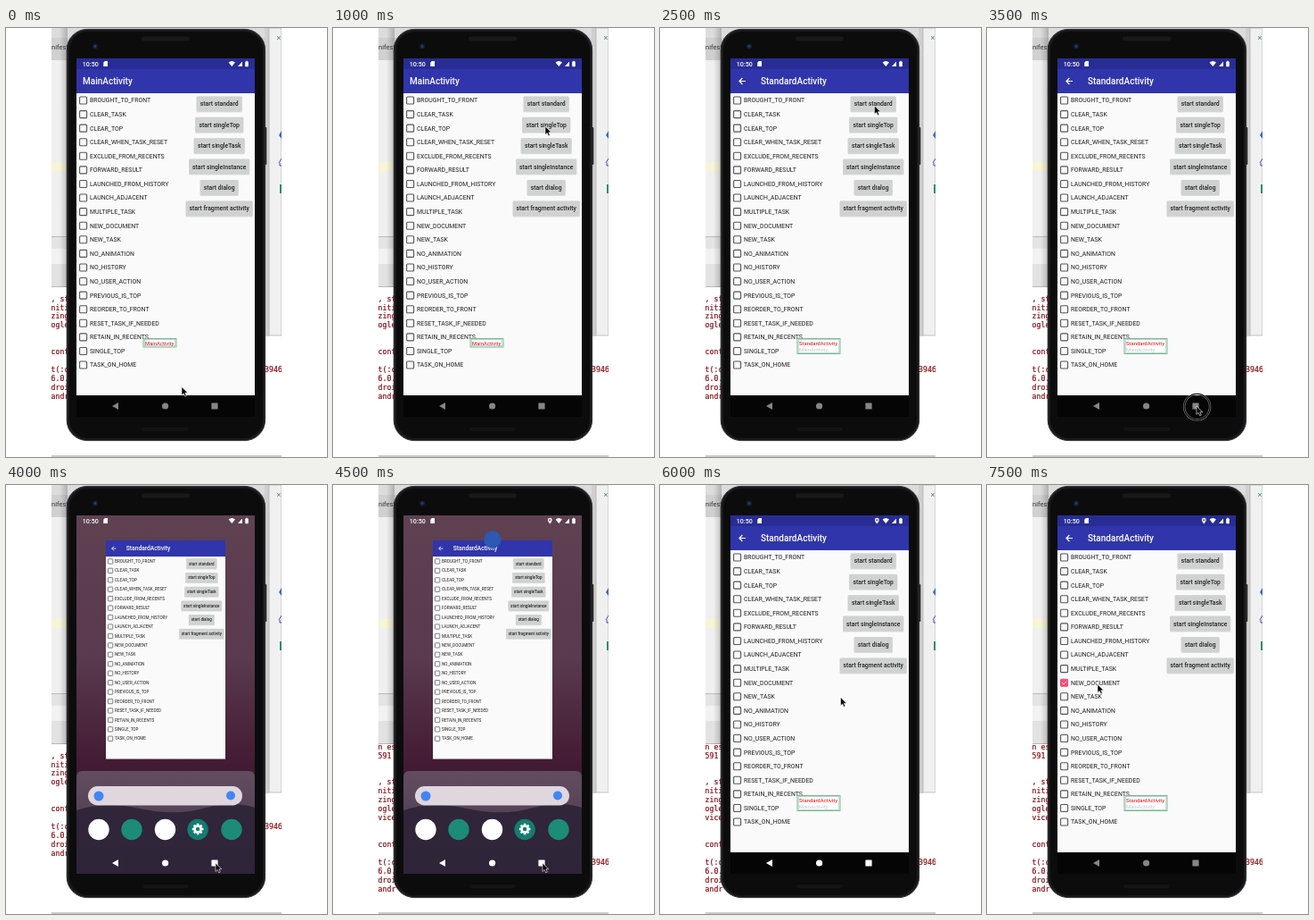
Recreate the animation shown at these times as an HTML page. Size 360 px wide and 480 px high, loop 8000 ms.

```html
<!DOCTYPE html>
<html lang="en">
<head>
<meta charset="utf-8">
<title>Activity launch demo</title>
<style>
html, body { margin: 0; width: 100%; height: 100%; overflow: hidden; background: #fff; }
svg { display: block; width: 360px; height: 480px; }
text { font-family: Roboto, sans-serif; white-space: pre; }
.mono text { font: 8.2px "DejaVu Sans Mono", monospace; fill: #8b0a14; stroke: #8b0a14; stroke-width: .2px; }
.label { font-size: 6.9px; fill: #1c1c1c; }
.button { font-size: 6.8px; font-weight: 500; fill: #222; text-anchor: middle; }
.title { font-size: 10px; font-weight: 500; fill: #fff; }
.stack { font-size: 5.9px; }
</style>
</head>
<body>
<svg id="stage" viewBox="0 0 360 480">
  <defs>
    <linearGradient id="wall" x1="0" y1="0" x2="0" y2="1">
      <stop offset="0" stop-color="#5f4152"/>
      <stop offset=".4" stop-color="#593a4e"/>
      <stop offset=".7" stop-color="#431a33"/>
      <stop offset="1" stop-color="#3a2035"/>
    </linearGradient>
    <linearGradient id="dock" x1="0" y1="0" x2="0" y2="1">
      <stop offset="0" stop-color="#624c5f"/>
      <stop offset="1" stop-color="#453650"/>
    </linearGradient>
    <linearGradient id="shade">
      <stop offset="0" stop-opacity="0"/>
      <stop offset="1" stop-opacity=".2"/>
    </linearGradient>
    <clipPath id="window"><rect x="51" width="258" height="480"/></clipPath>
    <clipPath id="screen"><rect x="79" y="34" width="200" height="401"/></clipPath>
  </defs>
  <g clip-path="url(#window)">
    <g id="desk"></g>
    <g id="console" class="mono"></g>
    <g id="phone"></g>
    <g clip-path="url(#screen)">
      <g id="home"></g>
      <g id="app"></g>
      <g id="bars"></g>
      <g id="icons"></g>
      <g id="badge"></g>
    </g>
    <g id="pointer">
      <g id="ring" fill="none" transform="translate(.6 .8)">
        <circle r="14.5" stroke="#fff" stroke-width="2.4" opacity=".5"/>
        <circle r="14.5" stroke="#111" stroke-width="1.3"/>
      </g>
      <path d="M0 0V9.4L2.2 7.4 3.7 10.8 5.3 10 3.9 6.7H6.8Z" fill="#000" stroke="#fff" stroke-width=".6"/>
    </g>
  </g>
</svg>
<script>
const $ = id => document.getElementById(id);
const rect = (x, y, w, h, fill, r = 0, extra = '') =>
  `<rect x="${x}" y="${y}" width="${w}" height="${h}" rx="${r}" fill="${fill}" ${extra}/>`;
const disc = (x, y, r, fill) => `<circle cx="${x}" cy="${y}" r="${r}" fill="${fill}"/>`;
const text = (x, y, s, cls = '', extra = '') => `<text x="${x}" y="${y}" class="${cls}" ${extra}>${s}</text>`;

const flags = `BROUGHT_TO_FRONT CLEAR_TASK CLEAR_TOP CLEAR_WHEN_TASK_RESET EXCLUDE_FROM_RECENTS
  FORWARD_RESULT LAUNCHED_FROM_HISTORY LAUNCH_ADJACENT MULTIPLE_TASK NEW_DOCUMENT NEW_TASK
  NO_ANIMATION NO_HISTORY NO_USER_ACTION PREVIOUS_IS_TOP REORDER_TO_FRONT RESET_TASK_IF_NEEDED
  RETAIN_IN_RECENTS SINGLE_TOP TASK_ON_HOME`.split(/\s+/);
const buttons = [['standard', 51], ['singleTop', 54], ['singleTask', 57],
  ['singleInstance', 68], ['dialog', 43], ['fragment activity', 75]];

// Desktop windows behind the phone
$('desk').innerHTML =
  [[0, 480, '#fff'], [0, 11, '#dcdcdc'], [11, 25, '#d0d0d0'], [36, 197, '#f0f0f0'], [150, 10, '#f8f4d6'],
   [233, 1, '#bbb'], [234, 13, '#e4e4e4'], [247, 17, '#f2f2f2'], [264, 25, '#e2e2e2'], [289, 1, '#b8b8b8'],
   [478, 2, '#ccc']].map(([y, h, c]) => rect(51, y, 258, h, c)).join('') +
  rect(60, 0, 9, 290, 'url(#shade)') +
  rect(290, 0, 5, 345, '#cfcfcf') + rect(295, 0, 14, 344, '#f0f0f0', 0, 'stroke="#aaa" stroke-width=".7"') +
  text(51, 24, 'nifest', '', 'font-size="7.5" fill="#333"') +
  text(303.5, 14, '×', '', 'font-size="9" fill="#4b8c80"') +
  '<path d="M309 115L306 120 309 124Z" fill="#3566c8"/>' +
  '<path d="M309 146L306 151M307 151V154H309" fill="none" stroke="#3f51b5"/>' +
  rect(307, 175, 2, 10, '#2c8a78');

// Phone body
$('phone').innerHTML =
  rect(290, 111, 2.3, 42, '#222', 1) +
  rect(68.2, 1.4, 222.4, 460.2, '#1a1a1c', 23, 'stroke="#303033" stroke-width="1"') +
  rect(71, 4, 217, 455, '#0c0c0d', 21) +
  rect(152, 9.5, 54, 5, '#19191b', 2.5) + rect(153, 447, 52, 4, '#141416', 2) +
  disc(100, 20.5, 3, '#15203a') + disc(100, 20.5, 1.2, '#2b4278');

// Launcher
const cog = Array.from({ length: 8 }, (_, i) =>
  `<rect x="213.8" y="378.7" width="2.6" height="3" fill="#fff" transform="rotate(${i * 45} 215.1 385)"/>`).join('');
$('home').innerHTML =
  rect(79, 34, 200, 401, 'url(#wall)') +
  '<path d="M79 327Q79 320 86 320H272Q279 320 279 327V435H79Z" fill="url(#dock)"/>' +
  '<path d="M79 364Q110 353 150 362T225 361Q255 353 279 361V435H79Z" fill="#2d2337" opacity=".9"/>' +
  rect(92, 337, 173, 21.5, '#e0d6de', 10.7) + disc(104, 348, 5.5, '#4285f4') + disc(252, 347.5, 5, '#4285f4') +
  [[104, '#fff'], [141, '#1c8b78'], [178.5, '#fff'], [215.1, '#127d70'], [253, '#1c8b78']]
    .map(([x, c]) => disc(x, 385.5, 11.7, c)).join('') +
  cog + disc(215.1, 385, 4.8, '#fff') + disc(215.1, 385, 2.2, '#127d70');

function drawApp({ standard, pressed, checked }) {
  const boxes = flags.map((name, i) => {
    const y = 81 + i * 15.58, on = checked && name === 'NEW_DOCUMENT';
    return rect(82.6, y - 4, 8, 8, on ? '#f25179' : 'none', 1, `stroke="${on ? '#f25179' : '#555'}" stroke-width="1.1"`) +
      (on ? `<path d="M84.3 ${y}l1.7 1.8 3.2-3.5" fill="none" stroke="#ffdbe3"/>` : '') +
      text(94, y + 2.4, name, 'label');
  }).join('');
  const starts = buttons.map(([name, w], i) => {
    const y = 85 + i * 23.4;
    return rect(239.2 - w / 2, y - 8.2, w, 17.6, '#aaa', 1.2, 'opacity=".35"') +
      rect(239.2 - w / 2, y - 8.6, w, 17.2, pressed && !i ? '#a9a9a9' : '#d0d2d1', 1.2) +
      text(239.2, y + 2.4, 'start ' + name, 'button');
  }).join('');
  return rect(79, 46, 200, 365, '#fafafa') + rect(79, 46, 200, 27, '#3035ab') +
    (standard
      ? '<path d="M96 59.5H89M92.4 56L89 59.5 92.4 63" fill="none" stroke="#fff" stroke-width="1.2"/>' +
        text(113, 63, 'StandardActivity', 'title')
      : text(86, 63, 'MainActivity', 'title')) + boxes + starts;
}

function drawOverlay(standard) {
  const w = standard ? 48 : 37, h = standard ? 17 : 9.5;
  return rect(154, 347.5, w, h, '#fff', 0, 'stroke="#7dbb82" stroke-width="1"') +
    rect(155.2, 348.7, w - 2.4, h - 2.4, 'none', 0, 'stroke="#7fbcc8" stroke-width=".6"') +
    text(156, 354.6, standard ? 'StandardActivity' : 'MainActivity', 'stack', 'fill="#e00000"') +
    (standard ? text(156, 362, 'MainActivity', 'stack', 'fill="#c4c4c4"') : '');
}

function drawIcons(located, nav) {
  return text(85.8, 42.8, '10:50', '', 'font-size="7.1" font-weight="500" fill="#fff"') +
    '<g fill="#fff"><path d="M109.3 38.7L110.8 37H114V43H109.3Z"/>' +
    '<path d="M249.6 38.6Q253.3 35.6 257 38.6L253.3 43Z"/><path d="M260 43L265 37.6V43Z"/>' +
    rect(268.2, 37.6, 3.6, 5.6, '#fff', .6) + rect(269.2, 36.8, 1.6, 1, '#fff') +
    (located ? '<path fill-rule="evenodd" d="M243.3 43.4Q240.9 40.8 240.9 39.2A2.4 2.4 0 0 1 245.7 39.2Q245.7 40.8 243.3 43.4M242.3 39.2A1 1 0 0 0 244.3 39.2A1 1 0 0 0 242.3 39.2"/>' : '') +
    `</g><path d="M119 423L126 419V427Z" fill="${nav}"/>` + disc(178.6, 423, 3.6, nav) +
    rect(230.4, 419.4, 7.2, 7.2, nav, .5);
}

function drawConsole(scrolled) {
  const lines = scrolled
    ? ['n es', '591', '', '', ', st', 'niti', 'zing', 'ogle', 'vice', '', '', 'cont', '', 't(:c', '6.0.', 'droi', 'andr']
    : ['', ', st', 'niti', 'zing', 'ogle', '', '', 'cont', '', 't(:c', '6.0.', 'droi', 'andr'];
  return lines.map((s, i) => text(50.6, 295.6 + i * 9.95, s) +
    (s === 't(:c' ? text(285.2, 295.6 + i * 9.95, '23946') : '')).join('');
}

// Pointer stops: time, x, y
const path = [[0, 197, 401.5], [500, 214, 285], [1000, 238, 110], [1500, 240.5, 87], [2500, 240.5, 87],
  [3000, 236, 405], [3500, 235, 423], [4500, 235, 423], [5500, 202.5, 237.5], [6500, 202.5, 237.5], [7500, 124, 223]];

function pointerAt(t) {
  const i = path.findIndex(p => p[0] >= t);
  if (!i) return path[0].slice(1);
  const [t0, x0, y0] = path[i - 1], [t1, x1, y1] = path[i], k = (t - t0) / (t1 - t0);
  return [x0 + (x1 - x0) * k, y0 + (y1 - y0) * k];
}

const tick = 500, loop = 8000;
let shown = -1;

function draw(t) {
  const standard = t >= 2000, recents = t >= 4000 && t < 6000, later = t >= 4500;
  const bright = t >= 4000 && t < 6500;

  $('app').innerHTML = drawApp({ standard, pressed: t === 1500, checked: t >= 7500 });
  $('app').setAttribute('transform', recents ? 'translate(112 62) scale(.67) translate(-79 -46)' : '');
  $('home').style.display = recents ? '' : 'none';
  $('bars').innerHTML = recents ? '' :
    rect(79, 34, 200, 12, '#282d95') + rect(79, 411, 200, 24, '#050506') + drawOverlay(standard);
  $('icons').innerHTML = drawIcons(later, bright ? '#fff' : '#858585');
  $('badge').innerHTML = recents && later ? disc(178.8, 61, 9.7, '#2d58b4') : '';
  $('console').innerHTML = drawConsole(later);
  $('ring').style.display = t === 3500 || t === 5500 ? '' : 'none';
  $('pointer').setAttribute('transform', `translate(${pointerAt(t)})`);
}

function frame() {
  const t = Math.floor(performance.now() % loop / tick) * tick;
  if (t !== shown) draw(shown = t);
  requestAnimationFrame(frame);
}
frame();
</script>
</body>
</html>
```
